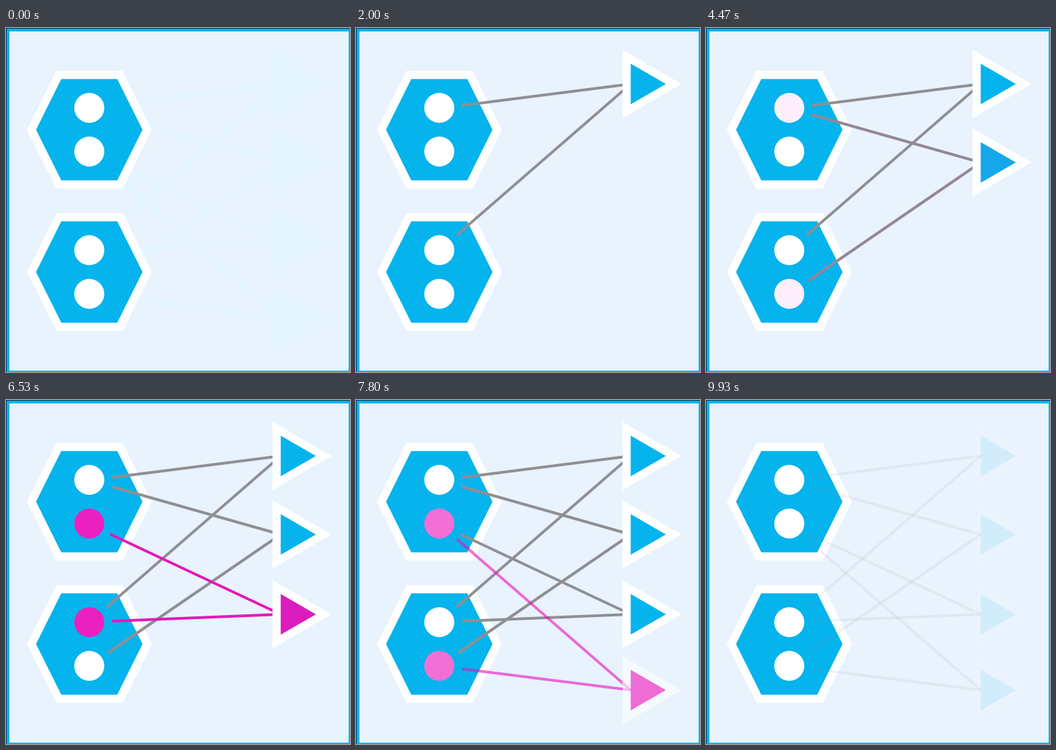
Write an HTML page with a canvas that moves like this. It is 504 px wide and 504 px high and loops after 10000 ms.

```html
<!DOCTYPE html>
<html lang="en">
<head>
<meta charset="utf-8">
<title>Linked nodes</title>
<style>
html, body { margin: 0; width: 100%; height: 100%; overflow: hidden; background: #e8f3fe; }
canvas { display: block; width: 504px; height: 504px; }
</style>
</head>
<body>
<canvas id="stage"></canvas>
<script>
const SIZE = 504, LOOP = 10000, FPS = 15, FADE = 0.5;
const BLUE = [5, 179, 237], PINK = [234, 16, 187], GRAY = [143, 143, 147], WHITE = [255, 255, 255];
const BACK = '#e8f3fe', GHOST = '#e5f5ff';
const TIP_X = 402.5, DOT_X = 122, HEX_STEP = 208.5;
const DOTS = [117, 181, 325.5, 389.5];

// Each stage links two dots to one triangle.
const STAGES = [
  { start: 0, y: 82, dots: [0, 2], from: [[155, 113.5], [147.5, 303.5]] },
  { start: 2.5, y: 197, dots: [0, 3], from: [[155, 127], [149.5, 370.5]] },
  { start: 5, y: 314, dots: [1, 2], from: [[152.5, 196.5], [155.5, 324]] },
  { start: 7.5, y: 425, dots: [1, 3], from: [[147.5, 203.5], [156, 394]] }
];

const canvas = document.getElementById('stage');
const ctx = canvas.getContext('2d');
const scale = window.devicePixelRatio || 1;
canvas.width = canvas.height = SIZE * scale;
ctx.scale(scale, scale);

const ramp = (t, start, length = FADE) => Math.min(1, Math.max(0, (t - start) / length));
const mix = (a, b, k) => `rgb(${a.map((v, i) => Math.round(v + (b[i] - v) * k)).join(',')})`;

function polygon(points, color) {
  ctx.beginPath();
  points.forEach(([x, y]) => ctx.lineTo(x, y));
  ctx.closePath();
  ctx.fillStyle = color;
  ctx.fill();
}

function hexagon(y, left, right, innerLeft, innerRight, half, color) {
  polygon([[left, y], [innerLeft, y - half], [innerRight, y - half],
    [right, y], [innerRight, y + half], [innerLeft, y + half]], color);
}

function triangle(y, left, right, half, color) {
  polygon([[left, y - half], [right, y], [left, y + half]], color);
}

function links(stage, color, width) {
  ctx.strokeStyle = color;
  ctx.lineWidth = width;
  for (const [x, y] of stage.from) {
    ctx.beginPath();
    ctx.moveTo(x, y);
    ctx.lineTo(TIP_X, stage.y);
    ctx.stroke();
  }
}

function drawFrame() {
  ctx.fillStyle = '#06344a';
  ctx.fillRect(0, 0, SIZE, SIZE);
  ctx.fillStyle = mix(BLUE, BLUE, 0);
  ctx.fillRect(1, 1, SIZE - 1, SIZE - 1);
  ctx.fillStyle = BACK;
  ctx.fillRect(5, 5, 497, 497);
}

function drawGhost(alpha) {
  ctx.globalAlpha = alpha;
  for (const stage of STAGES) {
    links(stage, GHOST, 11);
    triangle(stage.y, 387, 483, 55, GHOST);
  }
  ctx.globalAlpha = 1;
}

function draw(t) {
  const leave = 1 - ramp(t, 9.8, 0.15);
  const states = STAGES.map(stage => {
    const enter = ramp(t, stage.start);
    const calm = ramp(t, stage.start + 1.5);
    return { stage, alpha: enter * leave, calm, glow: enter * (1 - calm) };
  });
  const shown = states.filter(s => s.alpha > 0);

  drawFrame();
  if (t < FADE) drawGhost(1 - ramp(t, 0));

  for (const y of [149, 149 + HEX_STEP]) {
    hexagon(y, 30.5, 213.5, 74, 171, 86.3, '#fff');
    hexagon(y, 44, 200, 81, 163, 74.2, mix(BLUE, BLUE, 0));
  }
  DOTS.forEach((y, i) => {
    const glow = Math.max(...states.map(s => s.stage.dots.includes(i) ? s.glow : 0));
    ctx.beginPath();
    ctx.arc(DOT_X, y, 22, 0, Math.PI * 2);
    ctx.fillStyle = mix(WHITE, PINK, glow);
    ctx.fill();
  });

  for (const { stage, alpha, calm } of shown) {
    ctx.globalAlpha = alpha;
    links(stage, mix(PINK, GRAY, calm), 4);
  }
  for (const { stage, alpha, calm } of shown) {
    ctx.globalAlpha = alpha;
    triangle(stage.y, 390.5, 477, 50, '#fff');
    triangle(stage.y, TIP_X, 454, 29.7, mix(PINK, BLUE, calm));
  }
  ctx.globalAlpha = 1;
}

const origin = performance.now();
function tick() {
  const ms = (performance.now() - origin) % LOOP;
  const step = Math.floor((ms + 5) * FPS / 1000) % (LOOP * FPS / 1000);
  draw(step / FPS);
  requestAnimationFrame(tick);
}
tick();
</script>
</body>
</html>
```
